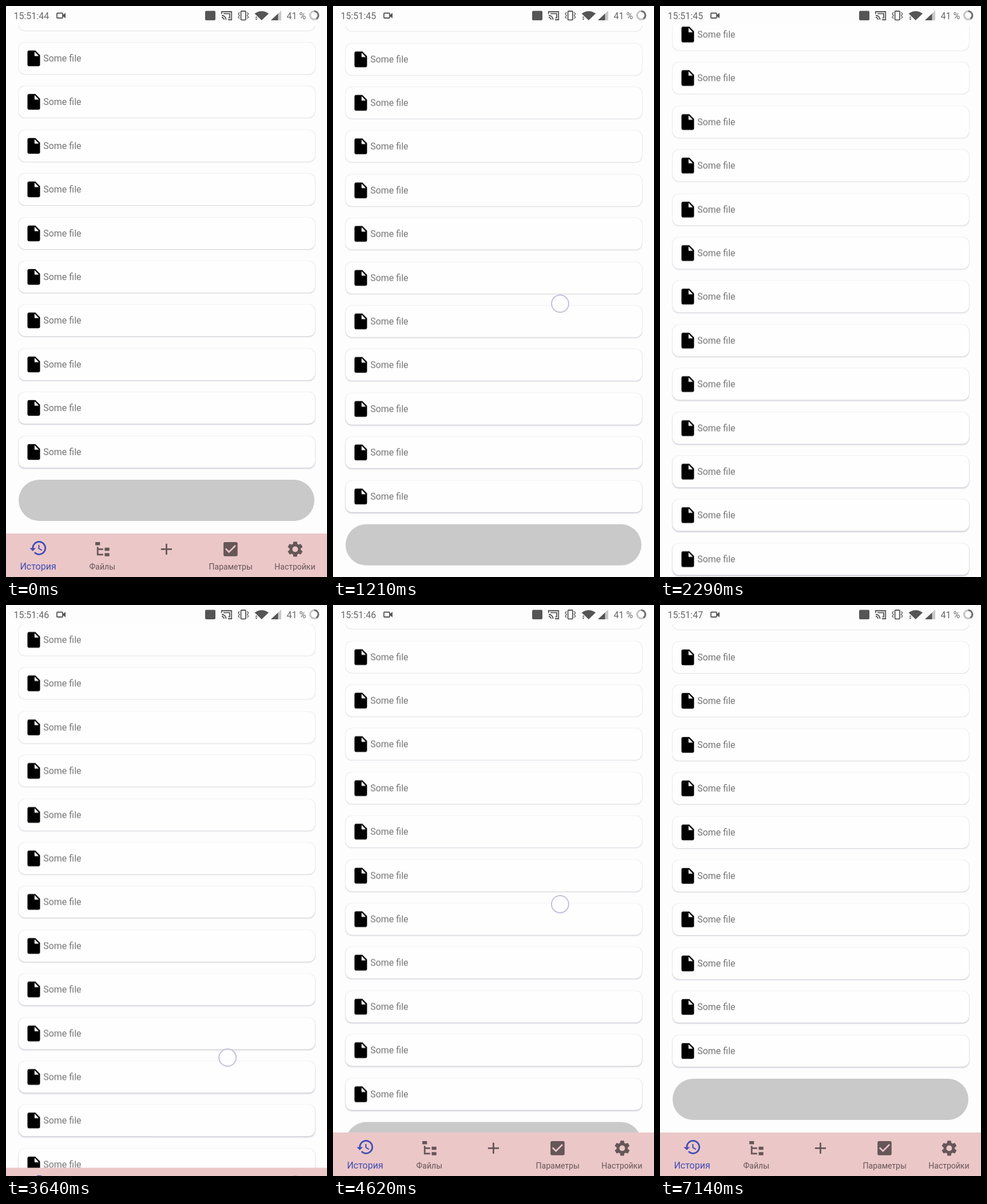
Animation of 561x998 px, one loop 7.16 s. Source, as an HTML page:

```html
<!DOCTYPE html>
<html lang="ru">
<head>
<meta charset="utf-8">
<title>Scrolling file list</title>
<style>
  html, body { margin: 0; width: 100%; height: 100%; overflow: hidden; background: #fdfdfd; }
  #stage { position: relative; width: 561px; height: 998px; overflow: hidden; background: #fdfdfd; font-family: Roboto, "Open Sans", sans-serif; }
  #stage > *, .card, .pill { position: absolute; }
  #list { left: 0; top: 0; width: 561px; height: 998px; will-change: transform; }
  .card { left: 22px; width: 517.5px; height: 55px; border-radius: 11px; background: #fefefe; }
  .card svg { position: absolute; left: 10.4px; top: 11px; width: 33px; height: 33px; }
  .card span { position: absolute; left: 43.2px; top: 0; font-size: 16px; line-height: 55px; color: #757575; white-space: nowrap; }
  .pill { left: 22px; top: 828px; width: 517px; height: 71.5px; border-radius: 36px; background: #c9c9c9; }
  #status { left: 0; top: 0; width: 561px; height: 34px; background: #fdfdfd; }
  #status text { font-size: 16px; fill: #666; }
  #nav { left: 0; top: 921.5px; width: 561px; height: 76.5px; background: #ebc7c8; display: flex; }
  .tab { position: relative; flex: 1; text-align: center; color: #655657; font-size: 14px; }
  .tab svg { position: absolute; left: 39.7px; top: 11px; width: 32.8px; height: 32.8px; fill: currentColor; }
  .tab span { position: absolute; left: 0; right: 0; top: 48px; line-height: 20px; white-space: nowrap; }
  .tab.on { color: #3f4db5; font-size: 16px; }
  .tab.on svg { top: 9.7px; }
  #touch { left: -16px; top: -16px; width: 28px; height: 28px; border: 2px solid #c2c1dc; border-radius: 50%; background: rgba(255,255,255,.55); }
</style>
</head>
<body>
<div id="stage">
  <div id="list"><div class="pill"></div></div>
  <svg id="status" viewBox="0 0 561 34">
    <text id="clock" x="13.5" y="22.5"></text>
    <g fill="none" stroke="#555" stroke-width="1.8">
      <rect x="89" y="12.5" width="10" height="8.5" rx="1"/>
      <path d="M376.8 14V10h17.4v14H388M377 16.5a7.5 7.5 0 0 1 7.5 7.5M377 20a4 4 0 0 1 4 4M380 13.3h11v7.4h-2.5"/>
      <rect x="410.6" y="9" width="8.4" height="15.4" rx="1.2"/>
      <path d="M408 11l-2 2.8 2 2.8-2 2.8 2 2.8M421.600 11l2 2.800-2 2.800 2 2.800-2 2.800" stroke-width="1.300"/>
    </g>
    <g fill="#555">
      <path d="M99 16l5-4v9.500l-5-4z"/>
      <rect x="348" y="8.500" width="18" height="16.500" rx="2"/>
      <path d="M434.500 13.300Q447 4.500 459 13.300L446.800 25z"/>
      <path d="M435.500 20.500l2-2.500 2 2.500zM435.500 22l2 2.500 2-2.500z"/>
      <path d="M481 8v17H463z" fill="#c9c9c9"/>
      <path d="M475.500 13.200V25H463z"/>
    </g>
    <text x="490.5" y="22.500">41 %</text>
    <g fill="none" stroke-width="3">
      <circle cx="538.700" cy="16.300" r="7.200" stroke="#c4c4c4"/>
      <circle cx="538.700" cy="16.300" r="7.200" stroke="#707070" pathLength="100" stroke-dasharray="41 59" transform="rotate(-90 538.700 16.300)"/>
    </g>
  </svg>
  <div id="nav"></div>
  <div id="touch"></div>
</div>
<script>
const LOOP = 7160, PITCH = 76.4, LAST_TOP = 751.5, CARDS = 17;
const $ = id => document.getElementById(id);
const list = $('list'), nav = $('nav'), touch = $('touch'), clock = $('clock');
const icon = d => `<svg viewBox="0 0 24 24"><path fill-rule="evenodd" d="${d}"/></svg>`;

const FILE = 'M6 2c-1.1 0-2 .9-2 2v16c0 1.1.9 2 2 2h12c1.1 0 2-.9 2-2V8l-6-6H6zm7 7V3.5L18.5 9H13z';
const TABS = [
  ['История', 'M13 3a9 9 0 0 0-9 9H1l3.9 3.9.1.1L9 12H6a7 7 0 1 1 2 4.900l-1.400 1.400A9 9 0 1 0 13 3zm-1 5v5l4.300 2.500.7-1.200-3.500-2.100V8H12z'],
  ['Файлы', 'M3 3h6v4H3zM15 10h6v4h-6zM15 17h6v4h-6zM13 13H7v5h6v2H5V9h2v2h6z'],
  ['', 'M19 13h-6v6h-2v-6H5v-2h6V5h2v6h6z'],
  ['Параметры', 'M10 17l-5-5 1.400-1.400 3.600 3.600 7.600-7.600L19 8zM19 3H5a2 2 0 0 0-2 2v14a2 2 0 0 0 2 2h14a2 2 0 0 0 2-2V5a2 2 0 0 0-2-2z'],
  ['Настройки', 'M19.140 12.940c.04-.3.06-.61.06-.94s-.02-.64-.07-.94l2.030-1.580a.5.5 0 0 0 .12-.61l-1.920-3.320a.5.5 0 0 0-.59-.22l-2.390.96a7 7 0 0 0-1.620-.94l-.36-2.540A.48.48 0 0 0 13.920 2.400h-3.840a.48.48 0 0 0-.48.41l-.36 2.540a7 7 0 0 0-1.620.94l-2.390-.96a.5.5 0 0 0-.59.22L2.720 8.870a.48.48 0 0 0 .12.61l2.030 1.580a6 6 0 0 0 0 1.880l-2.030 1.580a.5.5 0 0 0-.12.61l1.920 3.320c.12.22.37.29.59.22l2.390-.96c.5.38 1.030.7 1.620.94l.36 2.540c.05.24.24.41.48.41h3.840c.24 0 .44-.17.48-.41l.36-2.540a7 7 0 0 0 1.620-.94l2.390.96c.22.07.47 0 .59-.22l1.920-3.320a.48.48 0 0 0-.12-.61zM12 15.600a3.600 3.600 0 1 1 0-7.200 3.600 3.600 0 0 1 0 7.200z']
];
nav.innerHTML = TABS.map(([label, d], i) =>
  `<div class="tab${i ? '' : ' on'}">${icon(d)}<span>${label}</span></div>`).join('');

const cards = Array.from({ length: CARDS }, (_, i) => {
  const card = document.createElement('div');
  card.className = 'card';
  card.style.top = LAST_TOP - i * PITCH + 'px';
  card.innerHTML = icon(FILE) + '<span>Some file</span>';
  return list.appendChild(card);
});

const clamp = v => Math.min(1, Math.max(0, v));
const ramp = (t, a, b) => clamp((t - a) / (b - a));

// Smooth curve through [time, value, speed] keys
function curve(keys, t) {
  if (t <= keys[0][0]) return keys[0][1];
  for (let i = 1; i < keys.length; i++) {
    const [a, p, u] = keys[i - 1], [b, q, v] = keys[i];
    if (t > b) continue;
    const d = b - a, s = (t - a) / d, r = 1 - s;
    return r * r * (1 + 2 * s) * p + s * s * (3 - 2 * s) * q + d * s * r * (r * u - s * v);
  }
  return keys[keys.length - 1][1];
}

const DRAG_DOWN = [[430, 0, 0], [1210, 77.4, .29], [1630, 229.2, .36]];
const DRAG_UP = [[3480, 366.6, 0], [4180, 185.5, -.32], [5040, 12.9, -.12], [5220, 0, 0]];
const FINGER_DOWN = [[150, 420, 0], [1210, 520, .28], [1630, 662, .33], [1710, 682, .1]];
const FINGER_UP = [[3410, 820, 0], [4180, 623, -.28], [4960, 491, -.02]];

function scrollAt(t) {
  if (t <= 1630) return curve(DRAG_DOWN, t);
  if (t >= 3480) return curve(DRAG_UP, t);
  return 229.2 + 138.8 * (1 - Math.exp((1630 - t) / 410));
}

function draw(now) {
  const t = now % LOOP;
  const shift = scrollAt(t);
  list.style.transform = `translateY(${shift}px)`;

  // Shadows drop further the lower a card sits on the screen
  cards.forEach((card, i) => {
    const p = clamp((LAST_TOP - i * PITCH + shift) / 998);
    card.style.boxShadow =
      `0 0 1.5px rgba(70,65,100,.28), 0 ${.4 + 1.6 * p}px ${1.5 + p}px rgba(70,65,100,${.14 + .16 * p})`;
  });

  const hide = ramp(t, 600, 1100) ** 2;
  const show = 1 - (1 - ramp(t, 3600, 4140)) ** 3;
  nav.style.transform = `translateY(${78 * (hide - show)}px)`;

  const second = t > 3000;
  const y = curve(second ? FINGER_UP : FINGER_DOWN, t);
  const x = 397 - (y - 520) * .036 + Math.max(0, 520 - y) * .05;
  const alpha = second
    ? (t >= 3410) * (1 - ramp(t, 4960, 5120))
    : (t >= 150) * (1 - ramp(t, 1690, 1850));
  touch.style.transform = `translate(${x}px, ${y}px)`;
  touch.style.opacity = alpha;

  clock.textContent = '15:51:' + (44 + (t >= 350) + (t >= 2850) + (t >= 5350));
}

function tick() {
  draw(performance.now());
  requestAnimationFrame(tick);
}
draw(0);
tick();
</script>
</body>
</html>
```
